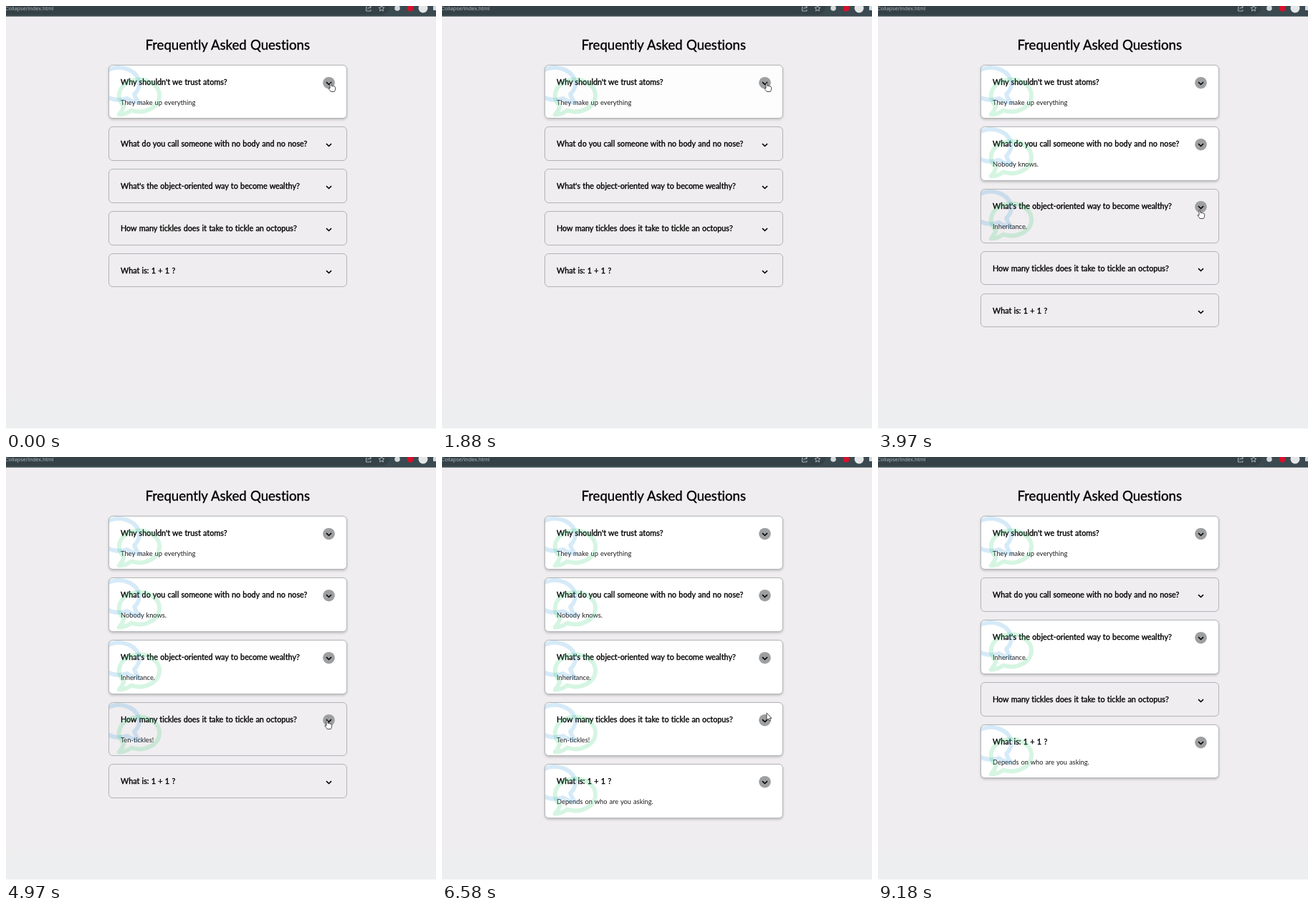
Animation, 600 px wide and 590 px high, one loop 9.21 s. Source, as an HTML page:

```html
<!DOCTYPE html>
<html lang="en">
<head>
<meta charset="utf-8">
<title>FAQ Collapse</title>
<style>
html, body { margin: 0; width: 100%; height: 100%; overflow: hidden; }
#stage {
  position: relative; width: 600px; height: 590px; overflow: hidden;
  background: linear-gradient(#efedef 540px, #edeeef 560px);
  font-family: Lato, "Open Sans", sans-serif; font-variant-ligatures: none;
}
#stage::after { content: ""; position: absolute; left: 0; bottom: 0; width: 100%; height: 1px; background: #fafafa; }
svg { display: block; position: absolute; left: 0; top: 0; }
.bar { font: 7.3px "Open Sans", sans-serif; fill: #b4bec2; }
.title, .question { fill: #000; stroke: #000; }
.title { font-size: 18.6px; word-spacing: .4px; stroke-width: .35px; }
.question { font-size: 10.8px; word-spacing: .5px; stroke-width: .35px; }
.answer { font-size: 9.3px; word-spacing: .6px; fill: #1c1c1e; }
#list { position: absolute; left: 143px; top: 81.7px; width: 333px; }
.faq {
  position: relative; box-sizing: border-box; margin-bottom: 11.1px;
  border: 1px solid #b2b4b7; border-radius: 6px; overflow: hidden;
}
.bubble { fill: none; stroke-width: 48; stroke-linejoin: round; opacity: .2; }
#cursor { position: absolute; left: 0; top: 0; }
#cursor svg { overflow: visible; }
#cursor path { fill: #fff; stroke: #222; stroke-width: .8; stroke-linejoin: round; }
</style>
</head>
<body>
<div id="stage">
  <svg width="600" height="80">
    <rect width="600" height="14" fill="#3a4a50"/>
    <rect x="-20" y="-12" width="555" height="24" rx="11" fill="#344147"/>
    <rect y="14" width="600" height="1" fill="#7d878b"/>
    <text class="bar" x="-1" y="5.8">Collapse/index.html</text>
    <g fill="none" stroke="#b4bec2" stroke-width=".9">
      <path d="M504 1.5H502.5V7H509V5M504.5 4.5Q505 1.5 509 1.5M507.5 -.5L509.8 1.5L507.5 3.5"/>
      <path d="M524 -1L525.2 2L528 2.2L525.8 4.1L526.5 7L524 5.4L521.5 7L522.2 4.1L520 2.2L522.8 2Z"/>
    </g>
    <circle cx="546" cy="3" r="3.8" fill="#d5dadc"/>
    <circle cx="564" cy="3" r="4.5" fill="#d3122b"/>
    <circle cx="582" cy="3" r="6.5" fill="#e4e6e7"/>
    <rect x="596" y="0" width="6" height="6" rx="1" fill="#d5dadc"/>
    <text class="title" x="194.5" y="61">Frequently Asked Questions</text>
  </svg>
  <div id="list"></div>
  <div id="cursor">
    <svg id="arrow" width="10" height="14"><path d="M0 0V10L2.3 8L3.9 11.4L5.5 10.7L4 7.3H7Z"/></svg>
    <svg id="hand" width="10" height="14"><path d="M-1 1Q0 -.7 1 1V4.5Q2 3.7 2.8 4.8Q3.9 4.1 4.6 5.2Q6.4 4.9 6.6 6.6V9Q6.3 11 5.2 12.5H.2Q-1 10.6 -3 8.3Q-3.5 6.6 -1 8Z"/></svg>
  </div>
</div>
<script>
const LOOP = 9210;
const BUBBLE = "M164 407A232 184 0 1 0 80 358Q65 412 24 456Q95 456 164 407Z";
const SHADOW = "0 1.7px 3.3px rgba(0,0,0,";

// toggles: times at which the card opens or closes
const cards = [
  { q: "Why shouldn't we trust atoms?", a: "They make up everything", open: true, toggles: [500, 1700] },
  { q: "What do you call someone with no body and no nose?", a: "Nobody knows.", toggles: [2600, 8650] },
  { q: "What's the object-oriented way to become wealthy?", a: "Inheritance.", toggles: [3950] },
  { q: "How many tickles does it take to tickle an octopus?", a: "Ten-tickles!", toggles: [4950, 6950] },
  { q: "What is: 1 + 1 ?", a: "Depends on who are you asking.", toggles: [5950] }
];

// tip of the pointer: time, x, y
const path = [
  [0, 453, 107], [1900, 453, 107], [2350, 451, 197], [3120, 451, 197],
  [3700, 449, 284], [4500, 449, 284], [4850, 448, 367], [5300, 448, 367],
  [5750, 449, 455], [6250, 449, 455], [6580, 453, 357], [6750, 451, 365],
  [7200, 451, 365], [7700, 453, 180], [7850, 453, 180], [8150, 451, 189],
  [8800, 451, 189], [9120, 480, -20], [LOOP, 480, -20]
];
const handSwaps = [1980, 2280, 3230, 3620, 4560, 4790, 5360, 5680, 6320, 6650, 7250, 8050, 8860];

function play(el, frames) {
  el.animate(frames, { duration: LOOP, iterations: Infinity });
}

// Alternate between two styles, each change lasting ms
function flip(el, styles, on, times, ms = 0) {
  let state = on ? 1 : 0;
  const frames = [{ offset: 0, ...styles[state] }];
  for (const t of times) {
    frames.push({ offset: t / LOOP, easing: "ease", ...styles[state] });
    state = 1 - state;
    frames.push({ offset: (t + ms) / LOOP, ...styles[state] });
  }
  frames.push({ offset: 1, ...styles[state] });
  play(el, frames);
}

const hidden = { opacity: 0 }, shown = { opacity: 1 };

for (const { q, a, open, toggles } of cards) {
  const el = document.createElement("div");
  el.className = "faq";
  el.innerHTML = `<svg width="333" height="76" viewBox="1 1 333 76">
    <text class="question" x="17" y="28">${q}</text>
    <g class="extra">
      <text class="answer" x="17" y="55.8">${a}</text>
      <circle cx="307.5" cy="25.2" r="8.3" fill="#9d9fa1"/>
      <path class="bubble" stroke="#3498db" transform="translate(45.8 -2.5) scale(-.1215 .1215)" d="${BUBBLE}"/>
      <path class="bubble" stroke="#2ecc71" transform="translate(11.8 14.1) scale(.1215)" d="${BUBBLE}"/>
    </g>
    <path d="M304 24.1L307.5 27.5L311 24.1" fill="none" stroke="#000" stroke-width="1.5"/>
  </svg>`;
  list.append(el);
  flip(el, [{ height: "47.7px" }, { height: "75.6px" }], open, toggles);
  flip(el.querySelector(".extra"), [hidden, shown], open, toggles);
  flip(el, [
    { backgroundColor: "rgba(255,255,255,0)", boxShadow: SHADOW + "0)" },
    { backgroundColor: "rgba(255,255,255,1)", boxShadow: SHADOW + ".2)" }
  ], open, toggles, 300);
}

play(cursor, path.map(([t, x, y]) => ({
  offset: t / LOOP, transform: `translate(${x}px, ${y}px)`, easing: "ease-in-out"
})));
flip(hand, [hidden, shown], true, handSwaps);
flip(arrow, [hidden, shown], false, handSwaps);
</script>
</body>
</html>
```
